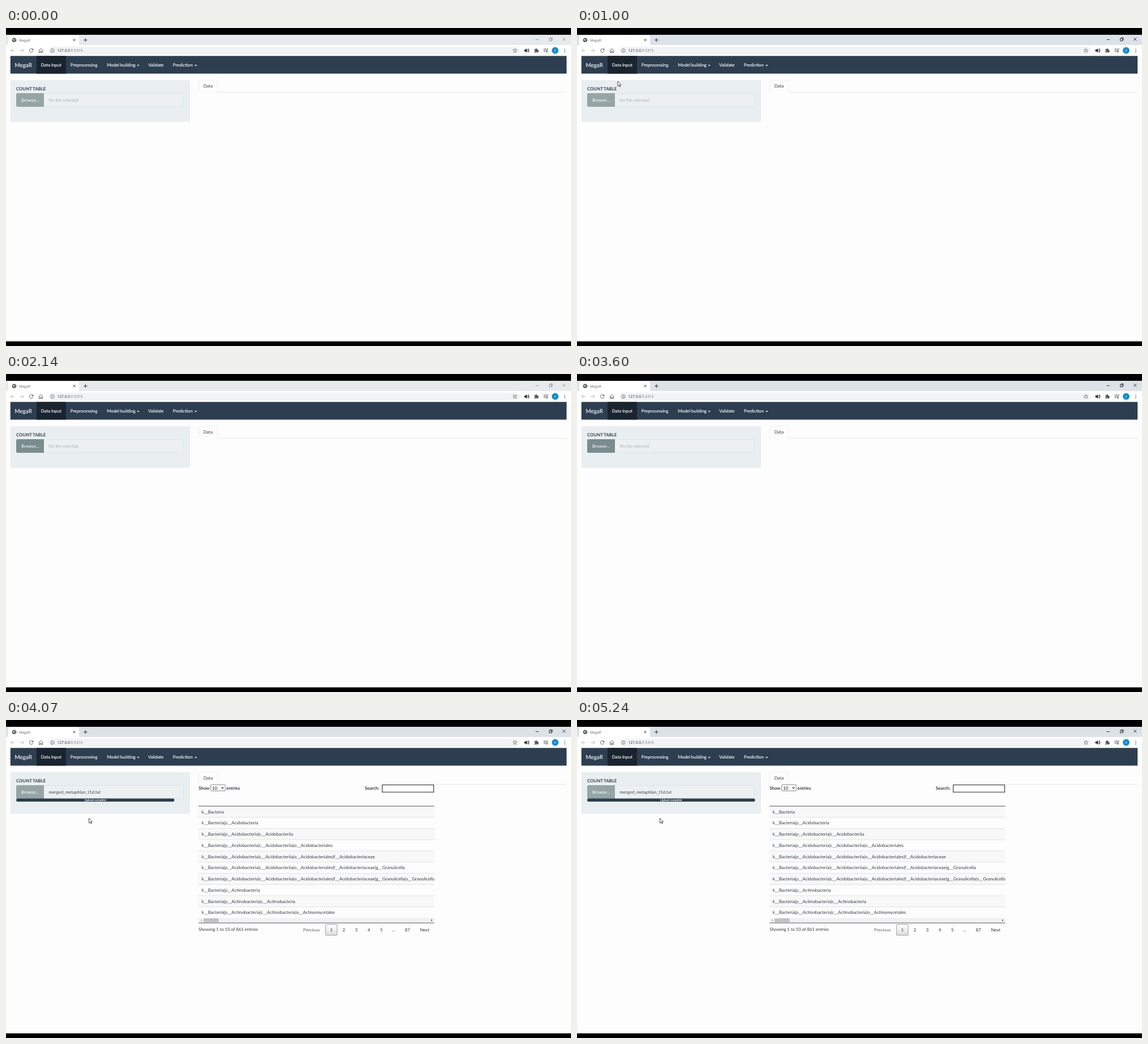
Animation, 998 px wide and 561 px high, one loop 5.28 s. Source, as an HTML page:

```html
<!DOCTYPE html>
<html lang="en">
<head>
<meta charset="utf-8">
<title>MegaR</title>
<style>
  html, body { margin: 0; width: 100%; height: 100%; overflow: hidden; background: #000; }
  svg { display: block; width: 998px; height: 561px; }
  text { font-family: Lato, sans-serif; font-size: 7.8px; word-spacing: -.22px; fill: #333b44; text-rendering: geometricPrecision; white-space: pre; }
  .ui { font-family: "Open Sans", sans-serif; }
  .nav text, #barText { fill: #fff; stroke: #fff; stroke-width: .12px; }
  .bold { font-weight: 700; }
  .line { fill: none; stroke: #5f6368; stroke-width: 1; }
</style>
</head>
<body>
<svg viewBox="0 0 998 561">
  <defs>
    <linearGradient id="pageFill" x2="0" y2="1">
      <stop stop-color="#fff"/><stop offset="1" stop-color="#dcdcdc"/>
    </linearGradient>
    <clipPath id="tableClip"><rect x="340" y="113" width="416.5" height="270"/></clipPath>
    <clipPath id="barClip"><rect id="barClipRect" x="18" y="138" height="7"/></clipPath>
  </defs>

  <rect width="998" height="561"/>
  <rect y="12.2" width="998" height="540.6" fill="#fdfdfd"/>

  <!-- browser window -->
  <rect id="titleBar" y="12.2" width="998" height="18"/>
  <path d="M2 30.5q2 0 2-3V16q0-3 3-3H126q3 0 3 3v11.500q0 3 2 3z" fill="#fff"/>
  <rect y="30" width="998" height="19.300" fill="#fff"/>
  <circle cx="14.500" cy="21.300" r="3.800" fill="#55595e"/>
  <path d="M12 19.500l2 .3 1 1.700-1.700.7zM15.500 18.500l1.700 1.500-1.200.7zM14.500 23l2-.5-1 1.700z" fill="#fff"/>
  <text class="ui" x="23" y="23.500" style="font-size:6.2px;fill:#5f6368">MegaR</text>
  <path class="line" d="M118.500 19.200l4 4m0-4l-4 4" style="stroke:#333"/>
  <path class="line" d="M137 21.200h6.600m-3.300-3.300v6.600" style="stroke:#333"/>
  <g id="windowButtons" fill="none" stroke-width=".9">
    <path d="M935.500 20.500h5.500"/>
    <path d="M959.500 18.800h4v4h-4zM961 18.500v-1.200h4v4h-1.200"/>
    <path d="M983.300 17.300l5 5m0-5l-5 5"/>
  </g>
  <path class="line" d="M15 39.800H8.500m3-3l-3 3 3 3M24.500 39.800H31m-3-3l3 3-3 3" style="stroke:#b4b7ba"/>
  <path class="line" d="M47.200 37.800a3.200 3.200 0 1 0 .6 2.500"/>
  <path d="M48.300 36v3h-3z" fill="#4d5156"/>
  <path class="line" d="M57.500 40l4-3.700 4 3.700M58.700 39.500v4h1.800v-2.500h2v2.500h1.800v-4"/>
  <rect x="75" y="32.800" width="833" height="14" rx="7" fill="#f1f3f4"/>
  <circle class="line" cx="82" cy="39.800" r="3.200" style="stroke-width:.8"/>
  <path class="line" d="M82 39.300v2.200M82 37.700v.8"/>
  <text class="ui" x="90.500" y="42.200" style="font-size:6.65px;fill:#202124">127.0.0.1<tspan fill="#6b7075">:5315</tspan></text>
  <path class="line" d="M899 36.200l1 2.300 2.500.2-1.900 1.700.6 2.500-2.200-1.300-2.200 1.300.6-2.500-1.900-1.700 2.500-.2z" style="stroke-width:.8"/>
  <path d="M915.500 38.200h2l2.500-2.200v7.500l-2.500-2.200h-2z" fill="#222"/>
  <path class="line" d="M921.300 37.500q1.500 2.300 0 4.600M922.500 36q3 3.700 0 7.300" style="stroke:#222"/>
  <path d="M933.300 37.500h2q0-1.700 1.200-1.700t1.200 1.700h2v2q1.500 0 1.500 1.200t-1.500 1.200v1.700h-2q0-1.400-1.200-1.400t-1.200 1.400h-2v-2q1.300 0 1.300-1.100t-1.300-1.100z" fill="#55595e"/>
  <path class="line" d="M949.500 37h5.500m-5.500 2.300h5.500m-5.500 2.300h3.500M956 42v-5.200h1.800"/>
  <circle cx="955.200" cy="42" r="1.200" fill="#55595e"/>
  <circle cx="970" cy="39.600" r="5.900" fill="#078ccf"/>
  <text class="ui" x="970" y="41.400" text-anchor="middle" style="font-size:6px;fill:#fff">y</text>
  <g fill="#55595e"><circle cx="987" cy="37.200" r=".8"/><circle cx="987" cy="39.800" r=".8"/><circle cx="987" cy="42.400" r=".8"/></g>

  <!-- navigation -->
  <g class="nav">
    <rect x="7.800" y="49.300" width="982.400" height="31.200" fill="#2c3e50"/>
    <rect x="54" y="49.300" width="52" height="31.200" fill="#1a242f"/>
    <text x="15.500" y="68.500" style="font-size:9.900px">MegaR</text>
    <text x="61.800" y="67.800">Data Input</text>
    <text x="113.800" y="67.800">Preprocessing</text>
    <text x="178.200" y="67.800">Model building</text>
    <text x="251" y="67.800">Validate</text>
    <text x="294.800" y="67.800">Prediction</text>
    <path d="M231.300 65h4.400l-2.200 2.200zM333 65h4.400l-2.200 2.200z" fill="#fff"/>
  </g>

  <!-- upload panel -->
  <rect x="7.800" y="92" width="317.200" height="73.500" fill="#e9eff0"/>
  <text class="bold" x="18" y="109.800">COUNT TABLE</text>
  <rect x="60" y="115.500" width="253.500" height="23" rx="2" fill="#ecf0f1" stroke="#dce4ec"/>
  <path id="browse" d="M67 115v24H20q-2 0-2-2V117q0-2 2-2z"/>
  <text x="27" y="129.800" style="fill:#fff">Browse...</text>
  <text id="fileName" x="75.300" y="130"></text>
  <g id="upload">
    <rect id="bar" x="18" y="138.500" height="5.400" rx="2.500" fill="#2c3e50"/>
    <text id="barText" y="143.300" text-anchor="middle" clip-path="url(#barClip)" style="font-size:5.2px">Upload complete</text>
  </g>

  <!-- data tab -->
  <path id="tabLine" stroke="#e4e9eb"/>
  <path d="M340.500 113.500V94q0-2 2-2H372q2 0 2 2v19.500" fill="#fdfdfd" stroke="#ecf0f1"/>
  <text x="348.800" y="105.300">Data</text>
  <g id="table"></g>

  <path id="cursor" d="M0 0V8.600L2 6.800 3.400 9.800 4.700 9.200 3.400 6.300H6z" fill="#fff" stroke="#222" stroke-width=".8"/>
</svg>
<script>
const LOOP = 5280;
const ACTIVATE = 500, DIALOG_OPEN = 1830, DIALOG_CLOSE = 3600;
const FILE_PICKED = 3660, TABLE_SHOWN = 3850;
const BAR_WIDTH = 296.500, BAR_TIME = 670;

const $ = id => document.getElementById(id);
const clamp = v => Math.max(0, Math.min(1, v));
const set = (id, attrs) => {
  for (const [key, value] of Object.entries(attrs)) $(id).setAttribute(key, value);
};
const show = (id, on) => set(id, { visibility: on ? 'visible' : 'hidden' });
const label = (x, y, text, attrs = '') => `<text x="${x}" y="${y}" ${attrs}>${text}</text>`;

function buildTable() {
  const acido = 'k__Bacteria|p__Acidobacteria';
  const order = acido + '|c__Acidobacteriia|o__Acidobacteriales';
  const genus = order + '|f__Acidobacteriaceae|g__Granulicella';
  const actino = 'k__Bacteria|p__Actinobacteria';
  const rows = [
    'k__Bacteria', acido, acido + '|c__Acidobacteriia', order,
    order + '|f__Acidobacteriaceae', genus, genus + '|s__Granulicella_unclassified',
    actino, actino + '|c__Actinobacteria', actino + '|c__Actinobacteria|o__Actinomycetales'
  ];
  const step = 19.74, top = 152.300;
  const body = rows.map((text, i) => {
    const y = top + i * step;
    return `<rect x="340" y="${y}" width="417" height="${step}" fill="${i % 2 ? '#fdfdfd' : '#f8f8f9'}"/>` +
      (i ? `<path d="M340 ${y - .3}H757" stroke="#dcdcdc" stroke-width=".8"/>` : '') +
      label(345.700, y + 12.300, text);
  }).join('');

  const pages = [[524.800, 'Previous', '#666'], [572.400, '1'], [594.500, '2'], [616.600, '3'],
    [638.800, '4'], [660.800, '5'], [681.700, '…'], [704.600, '87'], [731.200, 'Next']];

  $('table').innerHTML =
    label(340.300, 122.700, 'Show', 'class="bold"') +
    '<rect x="361.700" y="114.200" width="25.500" height="10.800" rx="1" fill="#fff" stroke="#666" stroke-width=".8"/>' +
    label(364, 122.500, '10', 'style="fill:#111"') +
    '<path d="M380.500 118.700l1.900 1.900 1.900-1.900" fill="none" stroke="#222" stroke-width="1.100"/>' +
    label(389.300, 122.700, 'entries', 'class="bold"') +
    label(633.800, 123.300, 'Search:', 'class="bold"') +
    '<rect x="664.500" y="114.500" width="91" height="12.700" fill="#fff" stroke="#222228"/>' +
    `<g clip-path="url(#tableClip)">${body}
      <rect x="340" y="349.300" width="417" height="8" fill="#f1f1f1"/>
      <rect x="349" y="350" width="26.500" height="6.800" fill="#c1c1c1"/>
      <path d="M346 351.800v3l-2-1.500z" fill="#999"/><path d="M751 351.500v3.600l2.300-1.800z" fill="#444"/>
      <path d="M340 152H757M340 358H757" stroke="#55555a"/>
    </g>` +
    label(340.300, 372.400, 'Showing 1 to 10 of 861 entries') +
    '<rect x="564.300" y="360.700" width="20.700" height="19" rx="1" fill="url(#pageFill)" stroke="#979797" stroke-width=".9"/>' +
    pages.map(([x, text, color = '#333']) => label(x, 372.700, text, `style="fill:${color}"`)).join('');
}

// Pointer keys: time, x, y
const pointerKeys = [[500, 190, 52], [1000, 72, 94], [1320, 50, 125], [DIALOG_OPEN, 50, 125]];

function pointerAt(t) {
  if (t >= FILE_PICKED) return [146.500, 173.200];
  if (t < ACTIVATE || t >= DIALOG_OPEN) return null;
  const i = pointerKeys.findIndex(key => key[0] > t);
  const a = pointerKeys[i - 1], b = pointerKeys[i];
  const u = clamp((t - a[0]) / (b[0] - a[0]));
  const k = u * u * (3 - 2 * u);
  return [a[1] + (b[1] - a[1]) * k, a[2] + (b[2] - a[2]) * k];
}

function render(t) {
  const active = (t >= ACTIVATE && t < DIALOG_OPEN) || t >= DIALOG_CLOSE;
  set('titleBar', { fill: active ? '#dde2e9' : '#e6eaed' });
  set('windowButtons', { stroke: active ? '#222' : '#909396' });

  const hover = t >= 1260 && t < FILE_PICKED;
  set('browse', { fill: hover ? '#798d8f' : '#95a5a6' });

  const picked = t >= FILE_PICKED;
  $('fileName').textContent = picked ? 'merged_metaphlan_t1d.txt' : 'No file selected';
  $('fileName').style.fill = picked ? '#3c4a58' : '#acb6bc';

  const width = BAR_WIDTH * (1 - (1 - clamp((t - FILE_PICKED) / BAR_TIME)) ** 3);
  set('bar', { width });
  set('barClipRect', { width });
  set('barText', { x: 18 + width / 2 });
  show('upload', picked);

  const loaded = t >= TABLE_SHOWN;
  show('table', loaded);
  set('tabLine', { d: `M${loaded ? 757 : 374} 113.500H990` });

  const pointer = pointerAt(t);
  show('cursor', pointer);
  if (pointer) set('cursor', { transform: `translate(${pointer})` });
}

buildTable();
const start = performance.now();
function tick() {
  render((performance.now() - start) % LOOP);
  requestAnimationFrame(tick);
}
tick();
</script>
</body>
</html>
```
